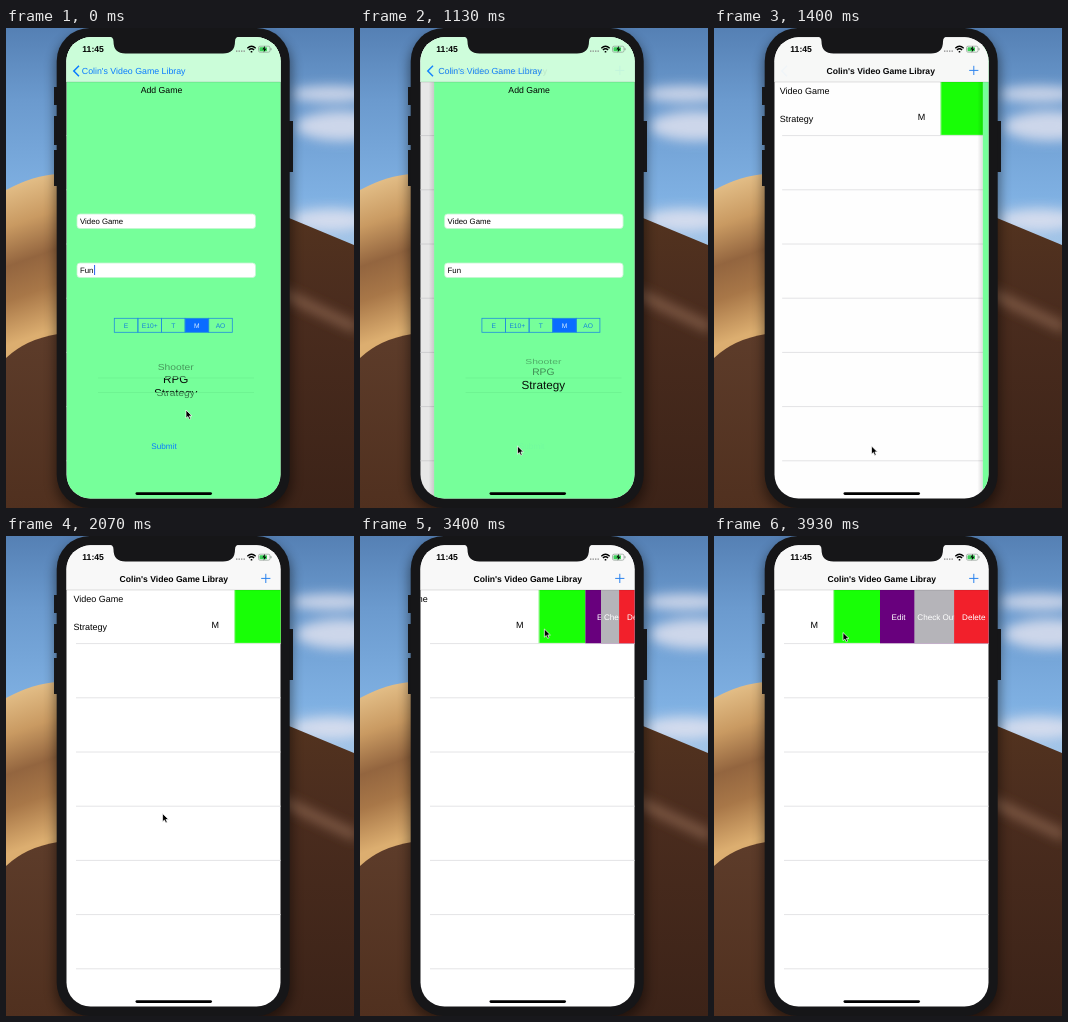
Animation, 348 px wide and 480 px high, one loop 3990 ms. Source, as an HTML page:

```html
<!DOCTYPE html>
<html lang="en">
<head>
<meta charset="utf-8">
<title>Game library app</title>
<style>
html, body { margin: 0; width: 100%; height: 100%; overflow: hidden; }
svg { display: block; width: 348px; height: 480px; }
text { font: 9px "Liberation Sans", Arial, sans-serif; text-rendering: geometricPrecision; white-space: pre; }
.bold { font-weight: bold; font-size: 8.6px; }
.mid { text-anchor: middle; }
.blue { fill: #0a7cff; }
</style>
</head>
<body>
<svg viewBox="0 0 348 480">
  <defs>
    <linearGradient id="sky" x2="0" y2="1">
      <stop offset="0" stop-color="#5580b4"/><stop offset=".3" stop-color="#6b9ace"/>
      <stop offset=".7" stop-color="#7fb0e2"/><stop offset="1" stop-color="#b5cfea"/>
    </linearGradient>
    <linearGradient id="sand" gradientUnits="userSpaceOnUse" x1="0" y1="160" x2="50" y2="300">
      <stop offset="0" stop-color="#e2bd86"/><stop offset=".25" stop-color="#c99a62"/>
      <stop offset=".5" stop-color="#93653f"/><stop offset=".72" stop-color="#a87748"/><stop offset="1" stop-color="#dcae70"/>
    </linearGradient>
    <linearGradient id="shade" x2="0" y2="1">
      <stop offset="0" stop-color="#5d3c2a"/><stop offset="1" stop-color="#50301f"/>
    </linearGradient>
    <linearGradient id="ridge" x2="0" y2="1">
      <stop offset="0" stop-color="#54341f"/><stop offset=".35" stop-color="#4a2c1e"/><stop offset="1" stop-color="#3c2318"/>
    </linearGradient>
    <linearGradient id="edge">
      <stop offset="0" stop-opacity="0"/><stop offset="1" stop-opacity=".13"/>
    </linearGradient>
    <filter id="soft" x="-50%" y="-50%" width="200%" height="200%"><feGaussianBlur stdDeviation="6"/></filter>
    <clipPath id="screen"><rect x="60.5" y="9.3" width="214" height="461.2" rx="24"/></clipPath>
    <clipPath id="band"><rect x="90" y="350" width="160" height="14.5"/></clipPath>
    <clipPath id="offBand"><path d="M90 320h160v30H90zM90 364.5h160v25H90z"/></clipPath>
    <clipPath id="row"><rect x="60" y="54" width="216" height="53.5"/></clipPath>
  </defs>

  <rect width="348" height="240" fill="url(#sky)"/>
  <g fill="#e4e4f0" filter="url(#soft)" opacity=".8">
    <ellipse cx="325" cy="66" rx="40" ry="8"/><ellipse cx="335" cy="98" rx="45" ry="15"/>
    <ellipse cx="325" cy="192" rx="40" ry="11"/>
  </g>
  <path d="M0 162Q28 147 52 146H100V480H0z" fill="url(#sand)"/>
  <path d="M0 330Q20 311 52 306H100V480H0z" fill="url(#shade)"/>
  <path d="M230 171L283 190L348 217V480H230z" fill="url(#ridge)"/>
  <path d="M270 262L350 300" stroke="#86614c" stroke-width="9" filter="url(#soft)"/>

  <rect x="49" y="6" width="237" height="480" rx="33" filter="url(#soft)" opacity=".45"/>
  <g fill="#161618">
    <path d="M48 59h5v18h-5zM48 88h5v29h-5zM48 122h5v36h-5zM282 93h5v51h-5z"/>
    <rect x="50.7" width="233" height="480" rx="33"/>
  </g>

  <g clip-path="url(#screen)">
    <rect x="60" y="9" width="216" height="462" fill="#fff"/>
    <g id="list">
      <path id="rules" stroke="#e4e4e6"/>
      <g clip-path="url(#row)">
        <g id="cell">
          <text x="67.5" y="66.3">Video Game</text>
          <text x="67.5" y="94.2">Strategy</text>
          <text x="205.5" y="92">M</text>
          <rect x="228" y="54" width="47" height="53.5" fill="#a6f7a0"/>
          <rect x="229.2" y="54" width="45.8" height="52.8" fill="#18ff06"/>
        </g>
        <g id="actions"></g>
      </g>
    </g>
    <rect id="dim" x="60" y="9" width="216" height="462"/>

    <g id="form">
      <rect x="55" y="54" width="5.5" height="417" fill="url(#edge)"/>
      <rect x="60.5" y="9" width="216" height="462" fill="#76ff9a"/>
      <text class="mid" x="155.5" y="64.8" style="font-size:8.7px">Add Game</text>
      <g fill="#fff" stroke="#c5f5d2" stroke-width=".8">
        <rect x="71" y="186" width="178.5" height="14.5" rx="3"/>
        <rect x="71" y="235" width="178.5" height="14.5" rx="3"/>
      </g>
      <text x="74" y="196" style="font-size:7.8px">Video Game</text>
      <text x="74" y="245" style="font-size:7.8px">Fun</text>
      <rect id="caret" x="88" y="237" width="1.1" height="10" fill="#3a6df0"/>
      <g id="segments"></g>
      <path d="M92 350H248M92 364.5H248" stroke="#6cef90" stroke-width=".7"/>
      <g id="outer" clip-path="url(#offBand)"></g>
      <g id="inner" clip-path="url(#band)"></g>
      <text id="submit" class="mid blue" x="158" y="421" style="font-size:8.2px">Submit</text>
    </g>

    <rect x="60" y="9" width="216" height="45" fill="#f8f8f8"/>
    <rect id="tint" x="60" y="9" width="216" height="45" fill="#cbfdd9"/>
    <path d="M60 54H276" stroke="#000" stroke-opacity=".2" stroke-width=".6"/>
    <g id="back">
      <path d="M73 37.8L67.8 43L73 48.2" fill="none" stroke="#0a7cff" stroke-width="1.5"/>
      <text id="backText" class="blue" y="45.8" style="font-size:8.8px">Colin's Video Game Libray</text>
    </g>
    <text id="title" class="bold" y="45.6">Colin's Video Game Libray</text>
    <path id="plus" d="M255.2 42.4h9.2M259.8 37.8v9.2" stroke="#2a82ee"/>

    <text class="bold" x="76.3" y="24.4">11:45</text>
    <path d="M230 23.2h9" stroke="#888" stroke-width="1.3" stroke-dasharray="1.4 1.1"/>
    <g fill="none" stroke="#000" stroke-width="1.4">
      <path d="M241.3 20.2q4.2-3.8 8.4 0M242.9 22q2.6-2.3 5.2 0"/>
      <path d="M244.7 23.8h1.6"/>
    </g>
    <rect x="252.5" y="18.2" width="11.5" height="6" rx="1.6" fill="none" stroke="#8c9a90" stroke-width=".7"/>
    <rect x="253.5" y="19.2" width="7.5" height="4" rx=".8" fill="#3ecf5a"/>
    <path d="M259 17.8l-2.6 3.8h1.8l-.6 3 2.8-3.9h-1.8z"/>
    <path d="M265 20.2v2" stroke="#8c9a90"/>
  </g>
  <path d="M102.5 8.5q5 0 5 5q0 12 12 12H217q12 0 12-12q0-5 5-5z" fill="#161618"/>
  <rect x="129.5" y="464.2" width="76.5" height="2.8" rx="1.4"/>
  <path id="cursor" d="M0 0V8.2L1.9 6.5L3.2 9.4L4.7 8.7L3.4 5.9H6z" stroke="#fff" stroke-width=".7"/>
</svg>
<script>
const LOOP = 3990;
const $ = id => document.getElementById(id);
const set = (id, attrs) => {
  for (const name in attrs) $(id).setAttribute(name, attrs[name]);
};
const shift = (id, x, y = 0) => set(id, { transform: `translate(${x} ${y})` });
const fade = (id, opacity) => set(id, { opacity });

// Linear interpolation through [time, ...values] keys.
function along(t, keys) {
  const i = keys.findIndex(k => k[0] > t);
  if (i < 0) return keys.at(-1).slice(1);
  if (i === 0) return keys[0].slice(1);
  const a = keys[i - 1], b = keys[i], u = (t - a[0]) / (b[0] - a[0]);
  return a.slice(1).map((v, j) => v + (b[j + 1] - v) * u);
}

// Remaining distance of a critically damped spring, from 1 to 0.
const spring = x => x < 0 ? 1 : (1 + x) * Math.exp(-x);

const pointer = [
  [0, 180, 382], [70, 180, 382], [500, 161, 412], [800, 157.5, 418], [1500, 157.5, 418],
  [2070, 156.5, 278], [2470, 182, 112], [2600, 186, 108], [3000, 251.5, 93.5], [3100, 251.5, 93.5],
  [3400, 184.5, 93], [3600, 162, 95], [3930, 129, 96.5]
];
const swipe = [[3150, 0], [3400, 49.5], [3600, 74], [3930, 109]];
const genres = ["Shooter", "RPG", "Strategy"];
const actions = [
  { label: "Edit", fill: "#68007d", share: .315, pad: 11.5 },
  { label: "Check Out", fill: "#b5b4b9", share: .365, pad: 3 },
  { label: "Delete", fill: "#f2202b", share: .32, pad: 8 }
];

set("rules", { d: [...Array(7).keys()].map(i => `M70 ${107.6 + i * 54.2}H276`).join("") });

$("segments").innerHTML = ["E", "E10+", "T", "M", "AO"].map((label, i) => {
  const on = label === "M", x = 108.3 + i * 23.6;
  return `<rect x="${x}" y="290.3" width="23.6" height="14" fill="${on ? "#0a6cff" : "none"}" stroke="#1f8ddd" stroke-width=".8"/>
    <text class="mid" x="${x + 11.8}" y="299.7" fill="${on ? "#d8ecff" : "#1583d8"}" style="font-size:6.7px">${label}</text>`;
}).join("");

const wheel = (size, pos, alpha) => genres.map((name, i) => {
  const d = i - pos, a = d * .395;
  return `<text class="mid" style="font-size:${size}px" opacity="${alpha(Math.abs(d))}"
    transform="translate(169.7 ${357 + 33.8 * Math.sin(a)}) scale(1 ${Math.cos(a)})" y="${size * .36}">${name}</text>`;
}).join("");

function drawActions(open) {
  let x = 275 - open;
  $("actions").innerHTML = open <= 0 ? "" : actions.map(({ label, fill, share, pad }) => {
    const part = `<rect x="${x}" y="54" width="${276 - x}" height="53.5" fill="${fill}"/>
      <text x="${x + pad}" y="84" fill="#fff" style="font-size:8.1px">${label}</text>`;
    x += open * share;
    return part;
  }).join("");
}

function draw(t) {
  const pos = 2 - .57 * spring(t * .011);
  $("outer").innerHTML = wheel(10.3, pos, d => Math.max(.25, .6 - .14 * d));
  $("inner").innerHTML = wheel(11.7, pos, () => .95);
  fade("caret", t < 600 ? 1 : 0);
  fade("submit", t < 1000 ? 1 : .03);

  const left = t < 1480 ? spring((t - 1109) * .0185) : 0, done = 1 - left;
  shift("form", t < 1480 ? 214.5 * done : 230);
  shift("list", -64 * left);
  fade("dim", .1 * left);
  fade("tint", left);
  fade("back", left);
  fade("title", done);
  fade("plus", done);
  set("backText", { x: 75.8 + 37 * done });
  set("title", { x: 113.6 - 37 * left });

  const [open] = along(t, swipe);
  shift("cell", -open);
  drawActions(open);
  shift("cursor", ...along(t, pointer));
}

function tick(now) {
  draw(now % LOOP);
  requestAnimationFrame(tick);
}
draw(0);
requestAnimationFrame(tick);
</script>
</body>
</html>
```
